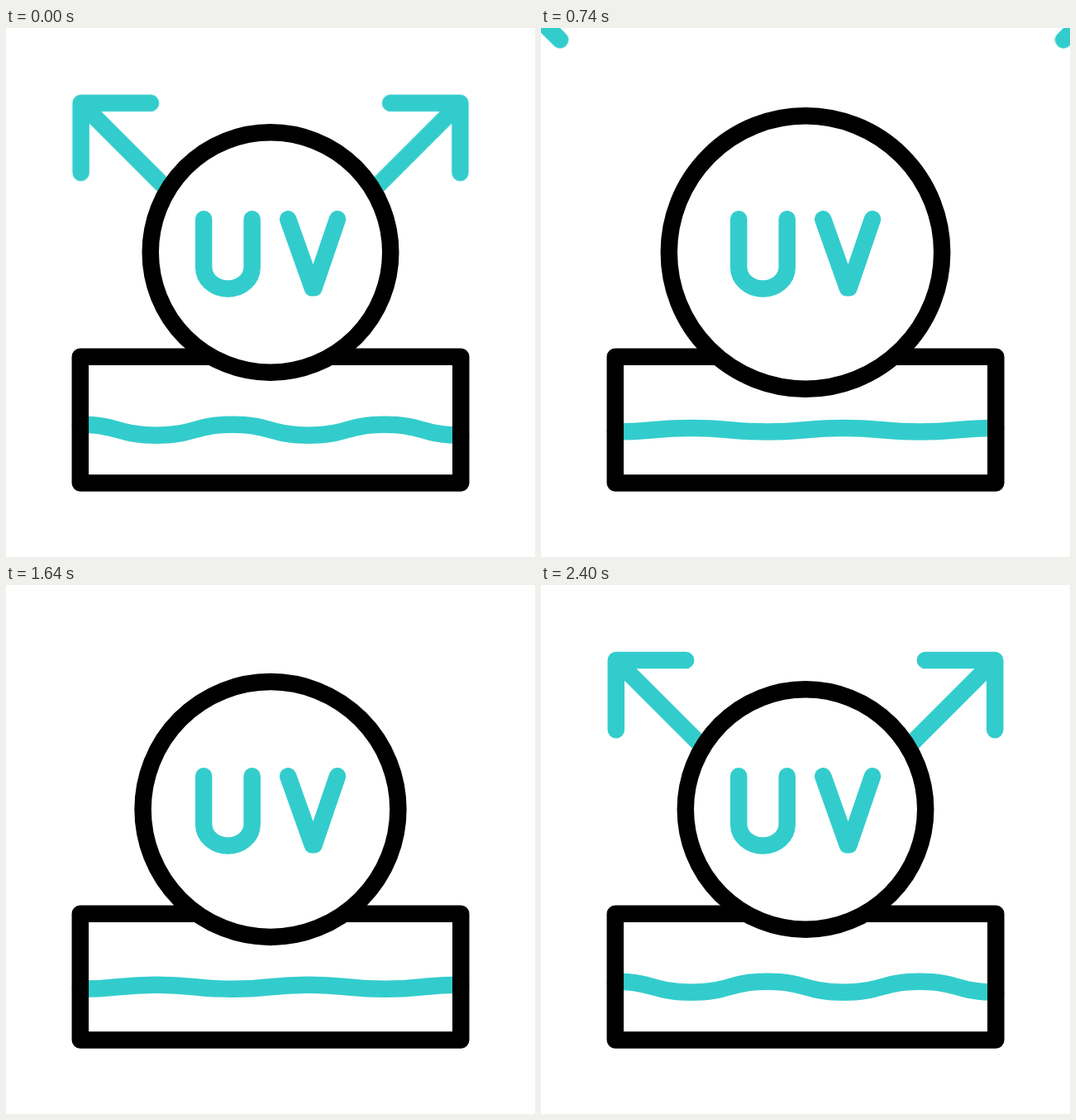
Write an HTML page that moves like this. It is 640x640 px and loops after 2420 ms.

```html
<!DOCTYPE html>
<html lang="en">
<head>
<meta charset="utf-8">
<title>UV reflection</title>
<style>
  html, body { margin: 0; width: 100%; height: 100%; overflow: hidden; background: #fff; }
  svg { display: block; width: 100vw; height: 100vh; }
  svg * { stroke-width: 20.5; stroke-linecap: round; stroke-linejoin: round; }
  .teal { fill: none; stroke: #3cc; }
  .black { fill: none; stroke: #000; }
  #disc { fill: #fff; }
</style>
</head>
<body>
<svg viewBox="0 0 640 640">
  <path id="wave" class="teal"/>
  <path class="black" d="M89.8 397.8H550.3V550.5H89.8Z"/>
  <path id="left" class="teal" d="M175.2 91H90.8V175.2M90.8 91L196.3 196.5"/>
  <path id="right" class="teal" d="M464.8 91H549.2V175.2M549.2 91L443.7 196.5"/>
  <circle id="disc" class="black" cx="320" cy="271.5" r="145.2"/>
  <path class="teal" d="M239.2 231.3V289.5A29.25 26 0 0 0 297.7 289.5V231.3"/>
  <path class="teal" d="M341.2 231.3L370.7 314.3H372.7L401 231.3"/>
</svg>
<script>
const LOOP = 2420;

// Each step: [time in ms, properties, easing towards the next step]
function play(id, steps) {
  const frames = steps.map(([ms, props, easing = 'linear']) =>
    ({ offset: ms / LOOP, easing, ...props }));
  document.getElementById(id).animate(frames, { duration: LOOP, iterations: Infinity });
}

const move = (x, y) => ({ transform: `translate(${x}px, ${y}px)` });
const radius = r => ({ r: `${r}px` });

function wave(amp) {
  const mid = 486.25, half = 92.1;
  let d = `M89.8 ${mid - amp}`;
  for (let i = 0; i < 5; i++) {
    const dy = (i % 2 ? -2 : 2) * amp;
    d += `c${half / 2} 0 ${half / 2} ${dy} ${half} ${dy}`;
  }
  return { d: `path("${d}")` };
}

// Arrows fly off, then come out again from behind the disc.
function arrow(id, outX, inX) {
  play(id, [
    [0, move(0, 0)],
    [1200, move(outX, -295)],
    [1200, move(inX, 192)],
    [1600, move(inX, 192)],
    [2400, move(0, 0)],
    [LOOP, move(0, 0)]
  ]);
}

arrow('left', -280.6, 190.5);
arrow('right', 305, -188);

play('disc', [
  [0, radius(145.2), 'cubic-bezier(.333,.667,.667,1)'],
  [600, radius(165.2)],
  [740, radius(165.2), 'cubic-bezier(.333,0,.833,.833)'],
  [2140, radius(145.2)],
  [LOOP, radius(145.2)]
]);

const swing = 'cubic-bezier(.37,0,.63,1)';
play('wave', [
  [0, wave(6.5), swing],
  [1200, wave(-6.4), swing],
  [2400, wave(6.5)],
  [LOOP, wave(6.5)]
]);
</script>
</body>
</html>
```
